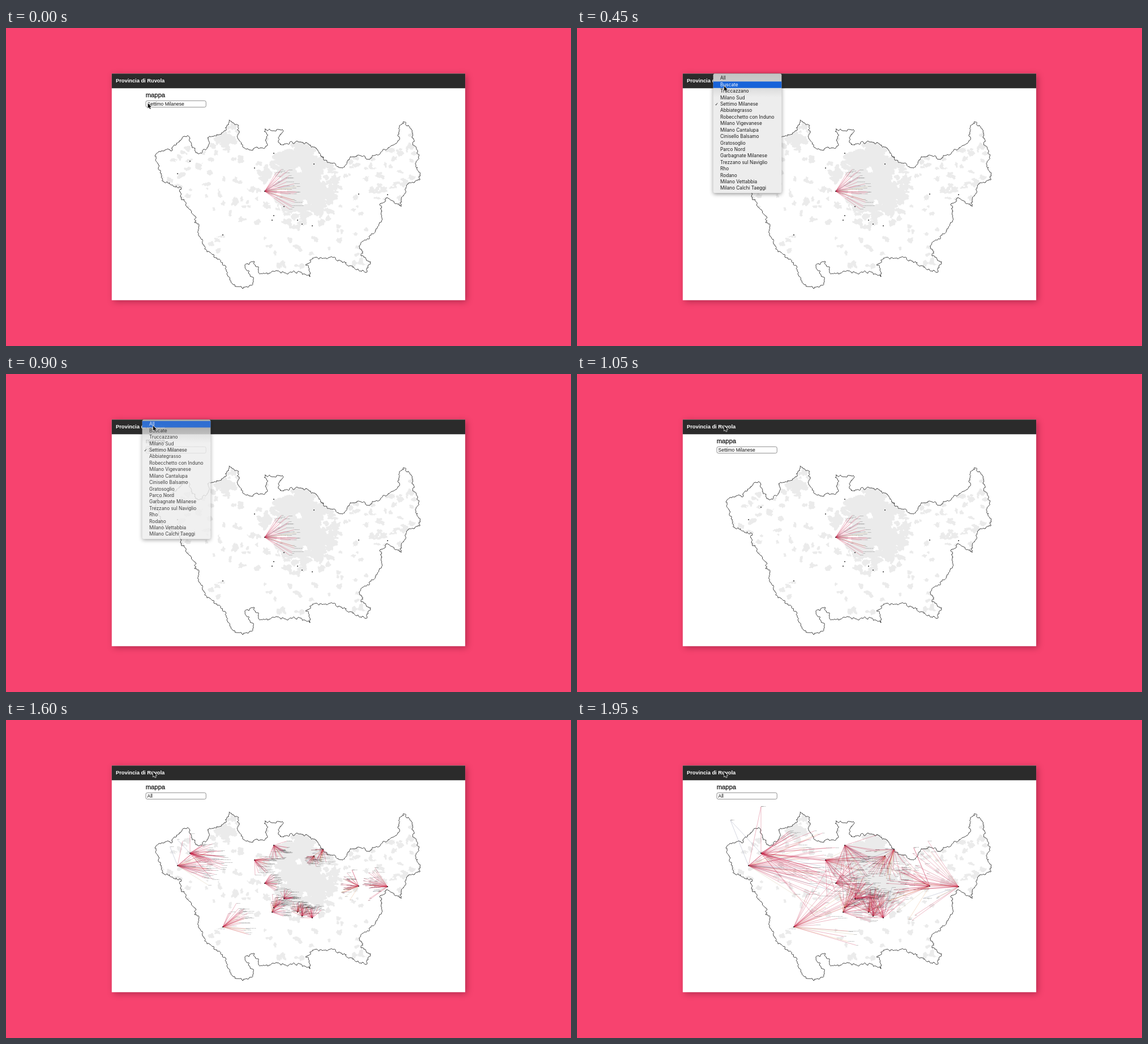
Write an HTML page with a canvas that moves like this. It is 998 by 561 pixels and loops after 2.95 s.

```html
<!DOCTYPE html>
<html lang="it">
<head>
<meta charset="utf-8">
<title>Mappa</title>
<style>
  html, body { margin: 0; width: 100%; height: 100%; overflow: hidden; background: #f7436f; }
  canvas { display: block; width: 100vw; height: 100vh; }
</style>
</head>
<body>
<canvas id="stage"></canvas>
<script>
const W = 998, H = 561, LOOP = 2950, STEP = 50, PICKED = 1250;
const SANS = '"Liberation Sans", Arial, sans-serif';
const MENU_FONT = '8.25px Inter, sans-serif';
const RED = '#c51f45', ORANGE = '#e0995a', TAN = '#c9b489', BLUE = '#747c9c';
const ROW = 11.41, ROW_TOP = 88.5;
const places = ['All', 'Buscate', 'Truccazzano', 'Milano Sud', 'Settimo Milanese',
  'Abbiategrasso', 'Robecchetto con Induno', 'Milano Vigevanese', 'Milano Cantalupa',
  'Cinisello Balsamo', 'Gratosoglio', 'Parco Nord', 'Garbagnate Milanese',
  'Trezzano sul Naviglio', 'Rho', 'Rodano', 'Milano Vettabbia', 'Milano Calchi Taeggi'];

const canvas = document.getElementById('stage');
const ratio = window.devicePixelRatio || 1;
canvas.width = W * ratio;
canvas.height = H * ratio;
const g = canvas.getContext('2d');

let seed = 7;
function rand() {
  seed = (seed + 0x6d2b79f5) | 0;
  let v = Math.imul(seed ^ (seed >>> 15), 1 | seed);
  v = (v + Math.imul(v ^ (v >>> 7), 61 | v)) ^ v;
  return ((v ^ (v >>> 14)) >>> 0) / 4294967296;
}
const clamp = v => Math.max(0, Math.min(1, v));
const lerp = (a, b, p) => a + (b - a) * p;
const ease = x => x < 0.5 ? 4 * x ** 3 : 1 - 4 * (1 - x) ** 3;
const range = (a, b) => a + (b - a) * rand();
const pairs = list => list.flatMap((v, i) => i % 2 ? [] : [[v, list[i + 1]]]);

// Closed polygon whose edges wander by midpoint displacement.
function rough(points, amount) {
  const path = new Path2D();
  const split = (ax, ay, bx, by) => {
    const dx = bx - ax, dy = by - ay, len = Math.hypot(dx, dy);
    if (len < 2.5) return path.lineTo(bx, by);
    const k = (rand() - 0.5) * amount * Math.min(1, 8 / len);
    const mx = (ax + bx) / 2 - dy * k, my = (ay + by) / 2 + dx * k;
    split(ax, ay, mx, my);
    split(mx, my, bx, by);
  };
  path.moveTo(...points[0]);
  points.forEach((p, i) => split(...p, ...points[(i + 1) % points.length]));
  path.closePath();
  return path;
}

// Corners of the border; the wander fills in the rest.
const border = rough(pairs([
  265,229, 270,218, 294,215, 311,194, 325,195, 327,207, 338,220, 355,211, 357,197, 388,181,
  394,162, 412,182, 410,196, 429,215, 461,208, 457,178, 488,179, 483,203, 521,201, 547,212,
  577,239, 598,245, 608,227, 646,229, 692,199, 693,185, 702,165, 717,180, 725,235, 732,256,
  731,268, 713,273, 698,315, 671,300, 660,312, 663,330, 655,354, 626,382, 627,402, 644,416,
  638,430, 588,409, 541,406, 529,418, 537,439, 510,430, 472,429, 446,431, 439,413, 422,419,
  437,440, 436,451, 418,460, 399,450, 388,420, 351,390, 340,352, 310,303, 309,281, 276,270
]), 0.75);

function blob(x, y, rx, ry, corners = 8) {
  const points = [];
  for (let i = 0; i < corners; i++) {
    const a = i / corners * Math.PI * 2, r = range(0.45, 1.3);
    points.push([x + Math.cos(a) * rx * r, y + Math.sin(a) * ry * r]);
  }
  return rough(points, 0.8);
}

const towns = new Path2D();
towns.addPath(blob(520, 229, 38, 25, 18));
towns.addPath(blob(532, 278, 52, 46, 26));
towns.addPath(blob(512, 316, 36, 16, 14));
towns.addPath(blob(391, 196, 20, 20, 12));
towns.addPath(blob(460, 257, 20, 13, 12));
for (let i = 0; i < 420; i++) {
  const x = range(265, 733), y = range(166, 438);
  const keep = y < 320 ? 0.95 : x > 455 ? 0.6 : 0.2;
  if (rand() < keep) towns.addPath(blob(x, y, range(2.5, 8), range(2.5, 7)));
}
for (let i = 0; i < 70; i++) {
  const a = range(0, Math.PI * 2), r = range(0.85, 1.3);
  towns.addPath(blob(528 + Math.cos(a) * 52 * r, 270 + Math.sin(a) * 66 * r,
    range(4, 10), range(3, 8)));
}

const CITY = { x: 525, y: 285 };
const phrase = 'cascina del parco lungo il canale';
const pickColor = c => c < 0.82 ? RED : c < 0.9 ? ORANGE : c < 0.95 ? TAN : BLUE;

function ray(x, y, color = pickColor(rand())) {
  return { x, y, color, label: phrase.slice(0, 4 + 19 * rand() ** 2.2) };
}

// Rays lean towards the city; far hubs send longer and narrower fans.
function makeHub([x, y]) {
  const dx = CITY.x - x, dy = CITY.y - y, dist = Math.hypot(dx, dy);
  const reach = 12 + 0.68 * dist, spread = 1.7 - dist / 220;
  const rays = Array.from({ length: 28 }, () => {
    const a = Math.atan2(dy, dx) + (rand() + rand() - 1) * spread;
    const r = reach * (0.2 + 0.8 * Math.sqrt(rand()));
    return ray(x + Math.cos(a) * r, y + Math.sin(a) * r);
  });
  return { x, y, rays };
}
const hubs = pairs([
  457,288, 303,257, 325,235, 439,247, 473,221, 544,240, 560,228, 491,315,
  473,331, 470,339, 383,365, 515,339, 523,346, 541,349, 623,293, 674,294
]).map(makeHub);
const settimo = hubs[0];
for (const west of hubs.slice(1, 3)) {
  west.rays.push(ray(325, 153, RED), ray(271, 177, BLUE));
  for (let i = 0; i < 4; i++) west.rays.push(ray(range(370, 386), range(195, 208), RED));
}

function text(str, x, y, font, color) {
  g.font = font;
  g.fillStyle = color;
  g.fillText(str, x, y);
}

function drawRays(h, p) {
  g.lineWidth = 0.5;
  g.globalAlpha = 0.62;
  for (const r of h.rays) {
    const x = lerp(h.x, r.x, p), y = lerp(h.y, r.y, p);
    g.strokeStyle = r.color;
    g.beginPath();
    g.moveTo(h.x, h.y);
    g.lineTo(x, y);
    g.stroke();
    text(r.label, x, y + 0.4, '2px ' + SANS, '#111');
  }
  g.globalAlpha = 1;
}

function drawMap(t) {
  g.save();
  g.clip(border);
  g.fillStyle = '#ebebeb';
  g.fill(towns);
  g.restore();
  g.strokeStyle = '#222';
  g.lineWidth = 0.85;
  g.lineJoin = 'round';
  g.stroke(border);
  if (t < PICKED) drawRays(settimo, 1);
  else hubs.forEach(h => drawRays(h, ease(clamp((t - 1360) / 510))));
  g.fillStyle = '#111';
  hubs.forEach(h => g.fillRect(h.x - 0.8, h.y - 0.8, 1.6, 1.6));
}

function drawPage(t) {
  g.fillStyle = '#f7436f';
  g.fillRect(0, 0, W, H);
  g.save();
  g.shadowColor = 'rgba(60,0,20,.38)';
  g.shadowBlur = 11 * ratio;
  g.shadowOffsetX = g.shadowOffsetY = 3 * ratio;
  g.fillStyle = '#fff';
  g.fillRect(186.8, 80.4, 624.3, 399.8);
  g.restore();
  g.fillStyle = '#2b2b2b';
  g.fillRect(186.8, 80.4, 624.3, 25.9);
  text('Provincia di Ruvola', 194, 95.7, 'bold 9.3px ' + SANS, '#fff');
  text('mappa', 246.7, 121.5, '11.2px ' + SANS, '#222');
  g.strokeStyle = '#222';
  g.lineWidth = 0.35;
  g.strokeText('mappa', 246.7, 121.5);
  g.beginPath();
  g.roundRect(247, 128.3, 106.3, 11.4, 2.8);
  g.strokeStyle = '#858585';
  g.lineWidth = 0.9;
  g.stroke();
  text(places[t < PICKED ? 4 : 0], 249.5, 137, '8.5px ' + SANS, '#111');
}

const menuFill = g.createLinearGradient(0, 80, 0, 122);
['#c3c3c3', '#c9c9c9', '#dedede', '#ededed']
  .forEach((c, i) => menuFill.addColorStop(i / 3, c));
const menuBox = new Path2D();
menuBox.roundRect(240.7, 80.5, 120.6, 210.5, 3);
const aroundMenu = new Path2D(menuBox);
aroundMenu.rect(0, 0, W, H);

function drawMenu(t, cursorY) {
  if (t < 50 || t >= 1050) return;
  const active = Math.round((cursorY - ROW_TOP) / ROW);
  g.save();
  g.globalAlpha = clamp((1050 - t) / 180);
  g.fillStyle = menuFill;
  g.fill(menuBox);
  // The shadow stays outside so that it does not darken the fading menu.
  g.save();
  g.clip(aroundMenu, 'evenodd');
  g.shadowColor = 'rgba(0,0,0,.42)';
  g.shadowBlur = 7 * ratio;
  g.shadowOffsetY = 2 * ratio;
  g.fill(menuBox);
  g.restore();
  g.fillStyle = '#1763d9';
  g.fillRect(240.7, ROW_TOP + active * ROW - 5.5, 120.6, ROW);
  places.forEach((name, i) => {
    const y = ROW_TOP + i * ROW + 2.9, color = i === active ? '#fff' : '#1c1c1c';
    text(name, 253, y, MENU_FONT, color);
    if (i === 4) text('✓', 243.6, y, 'bold 7.5px "DejaVu Sans", sans-serif', color);
  });
  g.restore();
}

const arrow = new Path2D('M0 0V9.2L2.1 7.3L3.6 10.6L5.1 9.9L3.7 6.8H6.5Z');
function drawCursor(x, y) {
  g.save();
  g.translate(x, y);
  g.strokeStyle = '#fff';
  g.lineWidth = 1.2;
  g.stroke(arrow);
  g.fillStyle = '#111';
  g.fill(arrow);
  g.restore();
}

function draw(t) {
  const rise = ease(clamp((t - 50) / 400)), last = ease(clamp((t - 600) / 200));
  const x = lerp(250.5, 259.7, rise), y = lerp(132.5, 102, rise) - 11 * last;
  g.setTransform(ratio, 0, 0, ratio, 0, 0);
  drawPage(t);
  drawMap(t);
  drawMenu(t, y);
  drawCursor(x, y);
}

const start = performance.now();
function tick() {
  const t = (performance.now() - start) % LOOP;
  draw(Math.floor(t / STEP) * STEP);
  requestAnimationFrame(tick);
}
tick();
</script>
</body>
</html>
```
